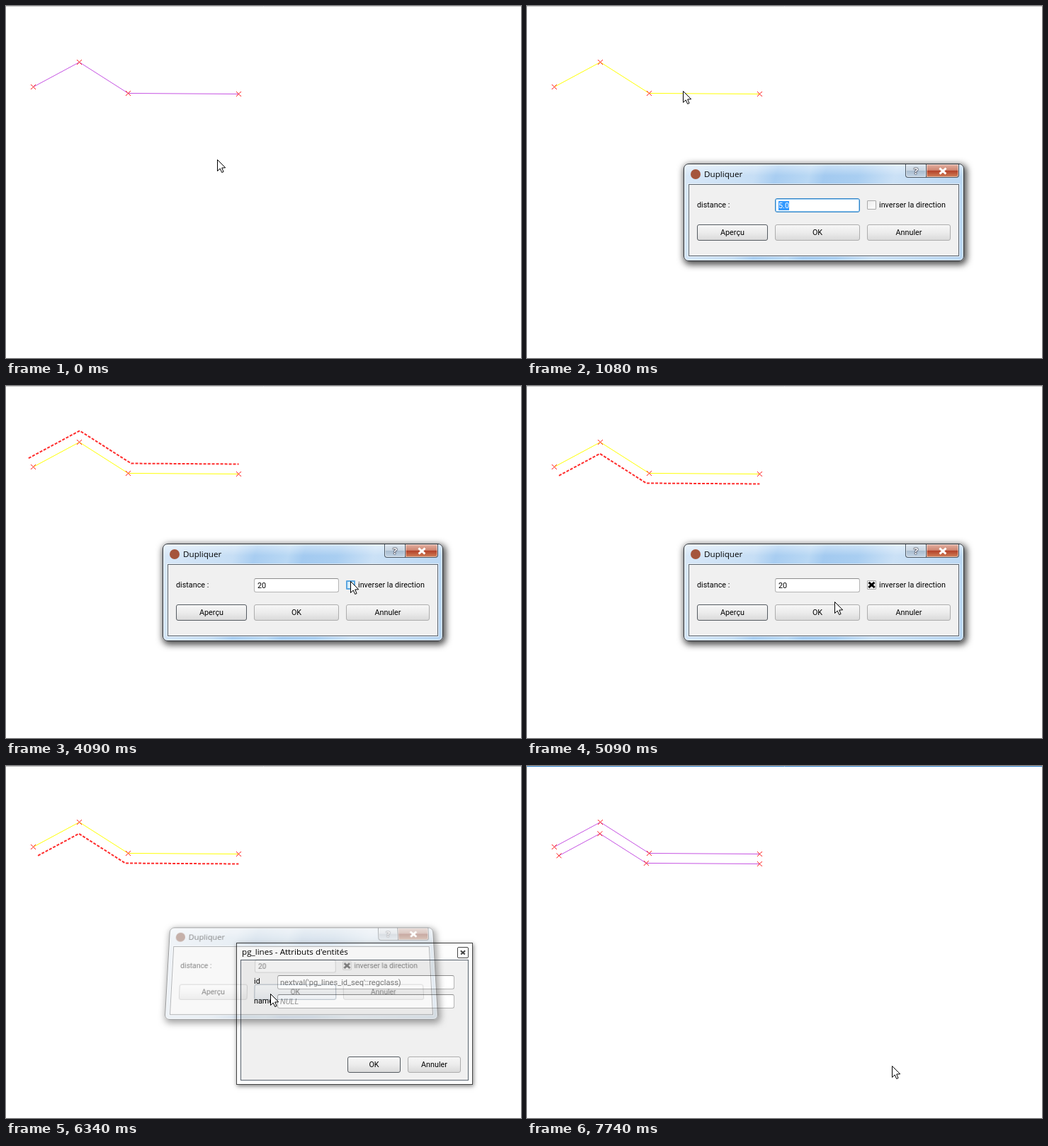
An HTML page with a canvas for the animation above (8.02 s loop, 727 px wide and 498 px high).

```html
<!DOCTYPE html>
<html lang="fr">
<head>
<meta charset="utf-8">
<title>Dupliquer</title>
<style>
html, body { margin: 0; width: 100%; height: 100%; overflow: hidden; background: #fff; }
#stage { position: relative; width: 727px; height: 498px; overflow: hidden; isolation: isolate; background: #fff; }
#stage * { position: absolute; box-sizing: border-box; }
canvas { left: 0; top: 0; }
.blend { mix-blend-mode: multiply; }
.ui { font: 10.8px Roboto, "Open Sans", sans-serif; color: #000; white-space: pre; }
.title { font: 11.65px "Open Sans", "Noto Sans", sans-serif; }
.glass {
  border: 1px solid #2b3138; border-radius: 7px;
  background:
    linear-gradient(rgba(255,255,255,.45), rgba(255,255,255,0) 16px),
    linear-gradient(105deg, #d9e8f7, #c6def5 24%, #a8cdf1 31%, #b9d8f4 42%, #a3caf0 47%, #a9cef1 58%, #cbe1f6 70%, #b7d5f2);
  box-shadow: inset 0 0 0 1px rgba(255,255,255,.7), 2px 3px 10px 2px rgba(0,0,0,.7);
}
.client { background: #f0f0f0; border: 1px solid #59636e; }
.glass + .client { box-shadow: 0 0 0 1px rgba(255,255,255,.6); }
.icon { border-radius: 50%; background: #a5553c; }
.cap { border: 1px solid #4c5967; border-top: 0; box-shadow: inset 0 0 0 1px rgba(255,255,255,.5); }
.help {
  border-radius: 0 0 0 4px; font: bold 13px/18px "Open Sans", sans-serif; text-align: center;
  color: #fff; text-shadow: 0 0 1px #223, 0 0 1px #223, 0 0 2px #223;
  background: linear-gradient(#dfe8f1, #c8d5e2 48%, #a9bccf 52%, #c4d5e6);
}
.close { border-radius: 0 0 4px 0; background: linear-gradient(#e3b1a3, #cf8672 46%, #b4432b 52%, #d18058); }
.x::before, .x::after {
  content: ""; position: absolute; left: 50%; top: 50%; width: var(--l); height: var(--w);
  margin: calc(var(--w) / -2) 0 0 calc(var(--l) / -2); background: var(--c); transform: rotate(42deg);
}
.x::after { transform: rotate(-42deg); }
.close.x { --l: 12px; --w: 2.6px; --c: #fff; }
.close.x::before, .close.x::after { filter: drop-shadow(0 0 .6px #542); }
.btn {
  border: 1px solid #adadad; border-radius: 3px; text-align: center; line-height: 22px;
  background: linear-gradient(#f6f6f6, #ececec 50%, #dadada);
}
.btn.default { border-color: #555b61; }
.btn.hover { border-color: #4a7398; background: linear-gradient(#f6fafd, #e9f1f7 50%, #d3e2ee); }
.btn.down { border-color: #5b5b5b; background: linear-gradient(#cfcfcf, #d9d9d9 40%, #e2e2e2); padding: 1px 0 0 2px; }
.edit { background: #fff; border: 1px solid #b4b4b4; border-top-color: #8c8c8c; border-radius: 3px; line-height: 19px; padding-left: 4px; }
.edit.focus { border-color: #2f82c6; box-shadow: inset 0 0 0 1px #9bcdf2; }
.edit.wide { font-size: 11.07px; color: #7c7c7c; padding-left: 3px; }
.edit.null { font-style: italic; color: #999; }
.edit span { position: static !important; display: inline-block; line-height: 13px; }
.edit.picked span { background: #3399ff; color: #fff; }
.edit.caret span { border-right: 1px solid #000; }
.check { border: 1px solid #a9a9a9; border-radius: 1px; background: linear-gradient(135deg, #ececec, #fff); --l: 11px; --w: 0px; --c: #000; }
.check.on { --w: 3.4px; }
.check.hover { border: 2px solid #5ba6e0; background: #d9eefc; }
.tool { background: #fdfdfd; border: 1px solid #444; box-shadow: 1px 2px 6px rgba(0,0,0,.5); }
.tool.active { box-shadow: 2px 3px 9px 1px rgba(0,0,0,.5); }
.toolx { border: 1px solid #444; border-radius: 2px; background: #fff; --l: 8px; --w: 1.5px; --c: #444; }
</style>
</head>
<body>
<div id="stage"></div>
<script>
const LOOP = 8020, W = 727, H = 498;
const stage = document.getElementById('stage');

function layer() {
  const c = document.createElement('canvas');
  c.width = W; c.height = H;
  stage.append(c);
  const g = c.getContext('2d');
  g.translate(.5, .5);
  return g;
}

// Dialog whose parts are placed in stage coordinates.
function dialog(x, y, w, h) {
  const root = document.createElement('div');
  root.style.cssText = `left:${x}px;top:${y}px;width:${w}px;height:${h}px`;
  stage.append(root);
  const add = (cls, px, py, pw, ph, text = '') => {
    const el = document.createElement('div');
    el.className = cls;
    el.style.cssText = `left:${px - x}px;top:${py - y}px;width:${pw}px;height:${ph}px`;
    el.textContent = text;
    el.box = [px, py, pw, ph];
    root.append(el);
    return el;
  };
  const label = (cls, px, mid, text) => {
    const el = add('ui ' + cls, px, mid - 9, 200, 18, text);
    el.style.lineHeight = '18px';
  };
  return { root, add, label };
}

const map = layer();

const form = dialog(325, 250, 334, 201);
const formFrame = form.add('tool', 325, 250, 334, 201);
form.add('client', 331, 274, 322, 171);
form.label('title', 333, 263, "pg_lines - Attributs d'entités");
form.add('toolx x', 637, 256, 16, 16);
form.label('', 350, 305, 'id');
form.label('', 350, 333, 'name');
form.add('ui edit wide', 383, 296, 250, 20, "nextval('pg_lines_id_seq'::regclass)");
form.add('ui edit wide null', 383, 323, 250, 20, 'NULL');
const formOk = form.add('ui btn default', 482, 411, 75, 23, 'OK');
form.add('ui btn', 567, 411, 75, 23, 'Annuler');

const copy = dialog(221, 223, 396, 138);
copy.root.className = 'blend';
copy.add('glass', 221, 223, 396, 138);
copy.add('client', 228, 252, 382, 102);
copy.add('icon', 231, 231, 14, 14);
copy.label('title', 250, 238, 'Dupliquer');
copy.add('cap help', 534, 224, 30, 19, '?');
copy.add('cap close x', 563, 224, 47, 19);
copy.label('', 240, 282, 'distance :');
const field = copy.add('ui edit', 350, 272, 120, 20);
const value = field.appendChild(document.createElement('span'));
const box = copy.add('check x', 480, 275, 13, 13);
copy.label('', 497, 282, 'inverser la direction');
const preview = copy.add('ui btn', 240, 309, 100, 23, 'Aperçu');
const ok = copy.add('ui btn', 350, 309, 120, 23, 'OK');
copy.add('ui btn', 480, 309, 118, 23, 'Annuler');

const pointer = layer();

// Pointer moves: from ms, to ms, end point.
const home = [298, 217];
const moves = [
  [70, 300, 220, 120],
  [1230, 1390, 364, 281],
  [2450, 2530, 300, 217],
  [2610, 2610, 275, 269],
  [2690, 2910, 288, 325],
  [3610, 3780, 474, 241],
  [3930, 4240, 490, 290],
  [4840, 5630, 373, 322],
  [6870, 7260, 515, 424]
];

const line = [[38, 114], [103, 79], [172, 123], [328, 124]];
const twin = offset(line, 14), mirror = offset(line, -14);

const within = (t, a, b) => t >= a && t < b;
const easeOut = p => p * (1.5 - .5 * p);

function ramp(t, start, end) {
  if (t < start) return 0;
  if (t >= end) return 1;
  const n = Math.round((end - start) / 79);
  return (Math.floor((t - start) / (end - start) * n + .03) + 1) / (n + 1);
}

// Parallel polyline at distance d, with mitred corners.
function offset(pts, d) {
  const normal = (a, b) => {
    const dx = b[0] - a[0], dy = b[1] - a[1], len = Math.hypot(dx, dy);
    return [-dy / len, dx / len];
  };
  const last = pts.length - 1;
  return pts.map((p, i) => {
    const m = normal(pts[Math.max(0, i - 1)], pts[Math.max(1, i)]);
    const n = normal(pts[Math.min(i, last - 1)], pts[Math.min(i + 1, last)]);
    const sx = m[0] + n[0], sy = m[1] + n[1], k = 2 * d / (sx * sx + sy * sy);
    return [p[0] + sx * k, p[1] + sy * k];
  });
}

function tipAt(t) {
  let [x, y] = home;
  for (const [start, end, ex, ey] of moves) {
    const u = easeOut(ramp(t, start, end));
    x += (ex - x) * u;
    y += (ey - y) * u;
  }
  return [Math.round(x), Math.round(y)];
}

function path(g, pts) {
  g.beginPath();
  pts.forEach(p => g.lineTo(p[0], p[1]));
}

function stroke(pts, color, width = 1, dash = []) {
  path(map, pts);
  map.strokeStyle = color;
  map.lineWidth = width;
  map.setLineDash(dash);
  map.stroke();
}

function vertices(pts) {
  for (const [x, y] of pts) {
    for (const r of [3.5, -3.5]) stroke([[x - 3.5, y - r], [x + 3.5, y + r]], '#ff1e1e');
  }
}

function drawMap(t) {
  const done = t >= 7740;
  map.clearRect(-1, -1, W + 1, H + 1);
  stroke([[-1, 0], [W, 0]], done ? '#2f7fc6' : t >= 6260 ? '#b8b8b8' : '#c9c9c9');
  stroke(line, within(t, 300, 7740) ? '#ffff00' : '#c552e2');
  vertices(line);
  if (done) {
    stroke(twin, '#c552e2');
    vertices(twin);
  } else if (t >= 3310) {
    stroke(t < 4530 ? mirror : twin, '#ff2c2c', 2, [4, 2]);
  }
}

function drawPointer(t, [x, y]) {
  const g = pointer;
  g.clearRect(-1, -1, W + 1, H + 1);
  g.save();
  g.translate(x, y);
  g.strokeStyle = '#000';
  if (within(t, 1390, 2450)) {
    path(g, [[0, -7], [0, 7]]);
    for (const end of [-7, 7]) {
      g.moveTo(-3, end);
      g.lineTo(3, end);
    }
  } else {
    path(g, [[0, 0], [0, 16], [3.7, 12.5], [6.2, 18], [8.6, 17], [6.2, 11.5], [11.2, 11.3]]);
    g.closePath();
    g.fillStyle = '#fff';
    g.fill();
  }
  g.stroke();
  g.restore();
}

// Dialogs tip forward while opening (tilt < 0) and back while closing.
function pose(el, alpha, tilt) {
  const amount = Math.abs(tilt), opening = tilt < 0;
  const size = 1 - amount * (opening ? .07 : .043);
  const dx = opening ? 0 : -2 * tilt, dy = opening ? tilt : .5 * tilt;
  el.style.visibility = alpha > 0 ? 'visible' : 'hidden';
  el.style.opacity = alpha;
  el.style.filter = amount ? `saturate(${1 - .45 * Math.min(1, amount)})` : 'none';
  el.style.transform = amount
    ? `translate(${dx}px,${dy}px) perspective(500px) rotateX(${8.5 * tilt}deg) scale(${size})`
    : 'none';
}

function flags(el, set) {
  for (const name in set) el.classList.toggle(name, set[name]);
}

function draw(t) {
  const tip = tipAt(t);
  const over = ({ box: [x, y, w, h] }, pad = 0) =>
    Math.abs(tip[0] - x - w / 2) <= w / 2 + pad && Math.abs(tip[1] - y - h / 2) <= h / 2 + pad;

  drawMap(t);

  const shown = ramp(t, 830, 1080), gone = ramp(t, 6260, 6570);
  pose(copy.root, (1 - (1 - shown) ** 2) * (1 - gone) ** 1.4, 2.5 * gone - 1.78 * (1 - shown) ** 2);
  const closed = ramp(t, 7420, 7660);
  pose(form.root, ramp(t, 6260, 6340) * (1 - closed), 2 * closed);

  value.textContent = t < 2070 ? '5.0' : t < 2300 ? '2' : '20';
  flags(field, { focus: t < 3230, picked: t < 2070, caret: within(t, 2070, 3230) });
  flags(box, { on: t >= 4530, hover: over(box, 3) });
  flags(preview, { default: t < 6100, hover: over(preview), down: within(t, 3230, 3310) });
  flags(ok, { default: t >= 6100, hover: over(ok), down: within(t, 6100, 6180) });
  flags(formOk, { hover: over(formOk), down: within(t, 7340, 7420) });
  flags(formFrame, { active: t >= 6870 });

  drawPointer(t, tip);
}

function tick() {
  draw(performance.now() % LOOP);
  requestAnimationFrame(tick);
}
tick();
</script>
</body>
</html>
```
